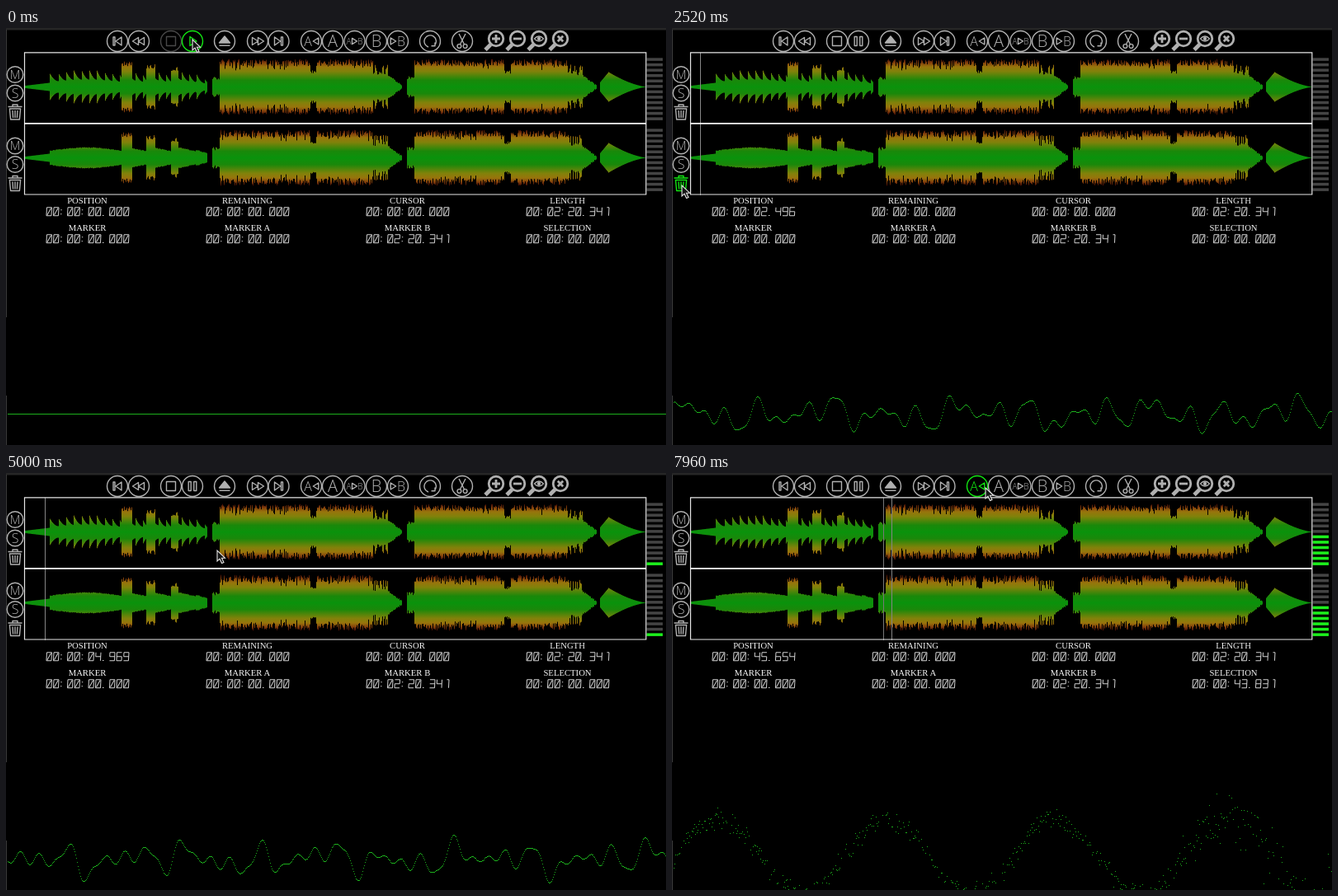
Write an HTML page that moves like this. It is 800 px wide and 506 px high and loops after 8000 ms.

```html
<!DOCTYPE html>
<html lang="en">
<head>
<meta charset="utf-8">
<title>Audio editor</title>
<style>
  html, body { margin: 0; width: 100%; height: 100%; overflow: hidden; background: #000; }
  svg { display: block; width: 100%; height: 100%; }
  .btn { color: #b0b0b0; fill: none; stroke: currentColor; stroke-width: 1.4; stroke-linejoin: round; }
  .btn text { fill: currentColor; stroke: none; font-family: "Open Sans", sans-serif; font-weight: 300; text-anchor: middle; }
  .btn .solid { fill: currentColor; }
  .btn .bold { stroke-width: 2.8; }
  .btn.off { color: #484848; }
  .btn.hot { color: #12e612; }
  .label { fill: #f4f4f4; font: 10.7px "Liberation Serif", serif; text-anchor: middle; }
  .lcd { fill: none; stroke: #d2d2d2; stroke-width: 1; }
  .crisp { shape-rendering: crispEdges; }
</style>
</head>
<body>
<svg id="stage" viewBox="0 0 800 506" preserveAspectRatio="none">
  <defs>
    <linearGradient id="heat" gradientUnits="userSpaceOnUse" x1="0" x2="0" y1="0" y2="34" spreadMethod="reflect">
      <stop offset="0" stop-color="#0a920c"/>
      <stop offset=".24" stop-color="#1a880a"/>
      <stop offset=".55" stop-color="#80820a"/>
      <stop offset=".72" stop-color="#98740c"/>
      <stop offset=".86" stop-color="#84400c"/>
      <stop offset="1" stop-color="#3c0804"/>
    </linearGradient>
  </defs>
  <rect width="800" height="506"/>
  <rect width="800" height="2.5" fill="#262626"/>
  <path d="M.5 2V351M.5 446V506" stroke="#3a3a3a"/>
</svg>
<script>
const LOOP = 8000, STEP = 40, LENGTH = 140341, SEEK = 6160, SEEK_POS = 43831.5;
const BLOCK = 512 / 44.1;
const LEFT = 22, WIDTH = 754, TAU = 2 * Math.PI;
const stage = document.getElementById('stage');

function add(tag, attrs, parent = stage) {
  const el = document.createElementNS('http://www.w3.org/2000/svg', tag);
  for (const k in attrs) el.setAttribute(k, attrs[k]);
  parent.append(el);
  return el;
}
const hash = n => { const v = Math.sin(n * 127.1 + 3.7) * 43758.5453; return v - Math.floor(v); };
const timeToX = ms => LEFT + ms / LENGTH * WIDTH;

// Linear interpolation over rows of [time, v1, v2 ...]
function tween(rows, t, col = 1) {
  const i = Math.max(1, rows.findIndex(r => r[0] >= t));
  const a = rows[i - 1], b = rows[i];
  return a[col] + (b[col] - a[col]) * (t - a[0]) / (b[0] - a[0]);
}

// ---- waveform overview: quiet intro with three hits, a loud part played twice, short outro
function intro(x, row) {
  if (x < 53) return 1.5 + (x - 23) * .12;
  let h;
  if (x < 140) h = 8 + 4 * Math.sin((x - 53) / 87 * Math.PI);
  else {
    const n = Math.floor((x - 140) / 30), u = (x - 140) % 30;
    if (n < 3 && u < 13 - 2 * n) return 25 - 3 * n + 6 * hash(x + row);
    h = n < 3 ? 14 - u * .22 : 9 - u * .3;
  }
  if (row) return h + hash(x);
  const p = (x - 54) % 9.3 / 9.3;
  return h * (.75 + (1 - p) ** 2);
}
function loudPart(u, row) {
  const r = hash(u + row * 500);
  if (u < 9) return 9 + 4 * r;
  if (u > 118 && u < 126) return 16 + 4 * r;
  if (u < 195) return 25 + 9 * r - (hash(u * 3 + row) < .12 ? 5 : 0);
  if (u < 213) return 14 + 14 * r;
  return u < 230 ? 13 * (1 - (u - 213) / 18) + 2 * r : 0;
}
function halfHeight(x, row) {
  if (x < 244) return intro(x, row);
  if (x < 250) return 0;
  if (x < 720) return loudPart((x - 250) % 235.5, row);
  const u = x - 720;
  return u < 10 ? 6 + 1.2 * u : 18 * (1 - (u - 10) / 48) ** 1.6 || 2;
}

const meters = [71, 157].map((cy, row) => {
  let d = '';
  for (let x = 23; x < 776; x++) {
    const h = halfHeight(x, row);
    if (h > 0) d += `M${x + .5} ${(-h).toFixed(1)}V${h.toFixed(1)}`;
  }
  add('path', { d, stroke: 'url(#heat)', transform: `translate(0 ${cy + .5})` });
  return Array.from({ length: 12 }, (_, i) =>
    add('rect', { x: 776.5, y: cy + 37.4 - i * 6.55, width: 19.5, height: 3.5 }));
});
const vline = color => add('path', { stroke: color, class: 'crisp' });
const posLine = vline('#858585'), seekLine = vline('#777'), cursorLine = vline('#7d857d');
add('path', { d: 'M22.5 29.8H775.8V202H22.5Z', fill: 'none', stroke: '#e6e6e6', 'stroke-width': 1.2 });
add('path', { d: 'M22 115.9H776', stroke: '#fff', 'stroke-width': 1.8 });

// ---- buttons
const buttons = [];
function button(x, y, r, body, ring = true) {
  const el = add('g', { class: 'btn', transform: `translate(${x} ${y})` });
  el.innerHTML = (ring ? `<circle r="${r}"/>` : '') + body;
  buttons.push({ x, y, r: r + .5, el });
  return el;
}
const path = (d, cls = '') => `<path class="${cls}" d="${d}"/>`;
const circle = (x, y, r, cls = '') => `<circle class="${cls}" cx="${x}" cy="${y}" r="${r}"/>`;
const text = (s, size, x = 0) => `<text x="${x}" y="${size * .36}" font-size="${size}">${s}</text>`;
const tri = (x, w, h) => `M${x} ${-h}L${x + w} 0L${x} ${h}Z`;
const box = (x, w, h) => `M${x} ${-h}h${w}v${2 * h}h${-w}Z`;
const PLAY = path(tri(-3, 8, 5.5)), PAUSE = path(box(-4.8, 3, 5.5) + box(1.8, 3, 5.5));

const tool = (x, body) => button(x, 16, 12.5, body);
tool(135, path(box(-5, 2, 5) + tri(5, -7, 5)));
tool(161, path(tri(-.5, -7, 4.5) + tri(6.5, -7, 4.5)));
const stop = tool(200, path(box(-5.5, 11, 5.5)));
const play = tool(226, `<g>${PLAY}</g>`).lastChild;
tool(265, path('M-6.5 2L0 -6L6.5 2Z', 'solid') + path('M-6.5 5.3H6.5'));
tool(305, path(tri(-6.5, 7, 4.5) + tri(.5, 7, 4.5)));
tool(330.5, path(box(3, 2, 5) + tri(-5, 7, 5)));
tool(370, text('A', 16, -4) + path(tri(8.8, -6.5, 4)));
tool(396, text('A', 20));
tool(422.5, text('A', 10, -7) + path(tri(-3, 6, 3.6)) + text('B', 10, 6.8));
tool(449, text('B', 20));
tool(475, path(tri(-8.8, 6.5, 4)) + text('B', 16, 4));
tool(514, path('M-2 7A7.2 7.2 0 1 1 5.5 5M1.5 5.8H6V1.5'));
tool(553, path('M-4 -9L2.6 4M4 -9L-2.6 4') + circle(-3.6, 6, 2.4) + circle(3.6, 6, 2.4));

const lens = (x, body) => button(x, 13, 9, circle(0, 0, 8.8, 'bold') +
  '<path d="M-6.5 7L-13 13.5" stroke-width="4.8"/>' + body, false);
lens(594, path('M-5 0H5M0 -5V5', 'bold'));
lens(620, path('M-5 0H5', 'bold'));
lens(646, path('M-5.5 0Q0 -6 5.5 0Q0 6 -5.5 0Z') + circle(0, 0, 1.5, 'solid'));
lens(672, path('M-3.2 -3.2L3.2 3.2M3.2 -3.2L-3.2 3.2', 'bold'));

for (const y of [0, 86.5]) {
  button(11, 56.5 + y, 9.8, text('M', 15));
  button(11, 79 + y, 9.8, text('S', 16));
  button(11, 102 + y, 9.8, path('M-8.5 -6.5H8.5M-3 -6.5V-9H3V-6.5M-6.6 -4L-5.4 9H5.4L6.6 -4ZM-3 -2L-2.4 7M0 -2V7M3 -2L2.4 7'), false);
}

// ---- readouts: segments a-g, h is the slash of zero, i the flag of one
const SEG = { a: 'm1 0h6', b: 'm7 0v5', c: 'm7 5v5', d: 'm1 10h6', e: 'm1 5v5', f: 'm1 0v5', g: 'm1 5h6', h: 'm2 9l4 -8', i: 'm4.5 0h2.5' };
const DIGITS = ['abcdefh', 'bci', 'abged', 'abgcd', 'fgbc', 'afgcd', 'afgedc', 'abc', 'abcdefg', 'abcdfg'];

function clock(ms) {
  ms = Math.floor(ms);
  const p = (v, n = 2) => String(Math.floor(v)).padStart(n, '0');
  return `${p(ms / 3600000)}:${p(ms / 60000 % 60)}:${p(ms / 1000 % 60)}.${p(ms % 1000, 3)}`;
}
function glyph(c, x) {
  if (c === ':') return `M${x + 1} 3h1.4m-1.4 5h1.4`;
  if (c === '.') return `M${x + 1} 9.8h1.5`;
  return [...DIGITS[c]].map(s => `M${x} 0${SEG[s]}`).join('');
}
function setClock(el, ms) {
  const s = clock(ms);
  if (el.getAttribute('aria-label') === s) return;
  el.setAttribute('d', [...s].map((c, i) => glyph(c, i * 8.5)).join(''));
  el.setAttribute('aria-label', s);
}
const readouts = {};
['POSITION', 'REMAINING', 'CURSOR', 'LENGTH', 'MARKER', 'MARKER A', 'MARKER B', 'SELECTION'].forEach((name, i) => {
  const x = 98.5 + i % 4 * 194, y = i < 4 ? 213 : 246;
  add('text', { x, y, class: 'label' }).textContent = name;
  readouts[name] = add('path', { class: 'lcd', role: 'img', transform: `translate(${x - 50} ${y + 4.8}) skewX(-3)` });
  setClock(readouts[name], name === 'LENGTH' || name === 'MARKER B' ? LENGTH : 0);
});

// ---- oscilloscope
const scope = add('path', { class: 'crisp', stroke: '#1cb01c', fill: 'none' });

// Soft music: a few sines whose phases change every step
function softWave(t) {
  const gain = Math.min(1, t / 1600);
  const parts = [190, 80, 47, 33, 21].map((len, i) => ({
    k: TAU / len, phase: TAU * hash(t * 5 + i), amp: gain * (9 - 2 * Math.abs(i - 2)) }));
  return x => 468 + parts.reduce((sum, p) => sum + p.amp * Math.sin(p.k * x + p.phase), 0);
}
// Loud music: scattered dots around a wave that grows longer and taller with the level
function loudWave(t, level) {
  const amp = 45 + 39 * (level - 6), len = 205 + 109 * (level - 6);
  const crest = 310 + (t - 6680) / STEP * 165;
  return x => {
    const n = x + t * 7;
    if (hash(n * 1.7) < .3) return NaN;
    const spread = 8 + amp * .1 + Math.max(0, x - 560) * .18;
    return 465 - amp * Math.cos(TAU * (x - crest) / len) + spread * (hash(n) + hash(n + .5) - 1) * 1.2;
  };
}
function drawScope(t, level) {
  const wave = t < SEEK ? softWave(t) : loudWave(t, level);
  let d = '';
  for (let x = 2; x < 800; x++) {
    const y = Math.max(269, Math.round(wave(x)));
    if (y < 506) d += `M${x} ${y + .5}h1`;
  }
  scope.setAttribute('d', d);
}

// ---- pointer
const POINTER = [[0, 226, 14], [560, 226, 14], [1080, 11, 127], [2400, 12, 191], [2700, 12, 191], [3320, 210.066, 99],
  [3360, 219, 98], [3560, 256, 94], [6200, 256, 94], [6440, 352, 150], [6640, 337.624, 170], [6680, 332, 172],
  [7440, 380, 18], [LOOP, 380, 18]];
const arrow = add('path', { d: 'M0 0V13L3 10.2L5.6 15.6L8 14.5L5.5 9.2H9.5Z', fill: '#151515', stroke: '#e4e4e4', 'stroke-width': 1.1 });
const pointer = t => [tween(POINTER, t, 1), tween(POINTER, t, 2)];

// Playback position in audio blocks
const BEFORE_SEEK = [[0, 0], [1080, 89], [2520, 215], [3360, 288], [5000, 428], [SEEK, 528]];
const AFTER_SEEK = [[SEEK, 0], [6680, 44], [7960, 157]];

const placeLine = (el, x) => el.setAttribute('d', x ? `M${Math.floor(x - .8) + .5} 30V203` : '');

function render(ms) {
  const t = Math.floor(ms / STEP) * STEP, playing = t > 0, seeked = t >= SEEK;

  const blocks = Math.round(tween(seeked ? AFTER_SEEK : BEFORE_SEEK, t));
  const pos = (seeked ? SEEK_POS : 0) + blocks * BLOCK;
  setClock(readouts.POSITION, pos);
  setClock(readouts.SELECTION, seeked ? SEEK_POS : 0);
  placeLine(posLine, playing && timeToX(pos));
  placeLine(seekLine, seeked && timeToX(SEEK_POS));

  // The cursor readout trails the pointer by one step
  const [x, y] = pointer(t), [lastX, lastY] = pointer(Math.max(0, t - STEP));
  const moving = x !== lastX || y !== lastY;
  const inside = moving && Math.min(x, lastX) > LEFT && y > 30 && y < 202;
  setClock(readouts.CURSOR, inside ? (lastX - LEFT) / WIDTH * LENGTH : 0);
  placeLine(cursorLine, inside && lastX);
  arrow.setAttribute('transform', `translate(${x} ${y})`);

  for (const b of buttons) b.el.classList.toggle('hot', Math.hypot(x - b.x, y - b.y) < b.r);
  stop.classList.toggle('off', !playing);
  const icon = playing ? PAUSE : PLAY;
  if (play.dataset.icon !== icon) play.innerHTML = play.dataset.icon = icon;

  const level = seeked ? Math.round(8 + 2 * Math.cos((t - 6680) / 256 * Math.PI)) : t > 2640 ? 1 : 0;
  for (const bars of meters) bars.forEach((bar, i) =>
    bar.setAttribute('fill', i >= level ? '#444' : i < 6 ? '#1cf01c' : i < 9 ? '#f4e22a' : '#a04a08'));

  drawScope(t, level);
}

const start = performance.now();
let shown = -1;
function tick() {
  const t = (performance.now() - start) % LOOP, step = Math.floor(t / STEP);
  if (step !== shown) render(t);
  shown = step;
  requestAnimationFrame(tick);
}
render(0);
tick();
</script>
</body>
</html>
```
